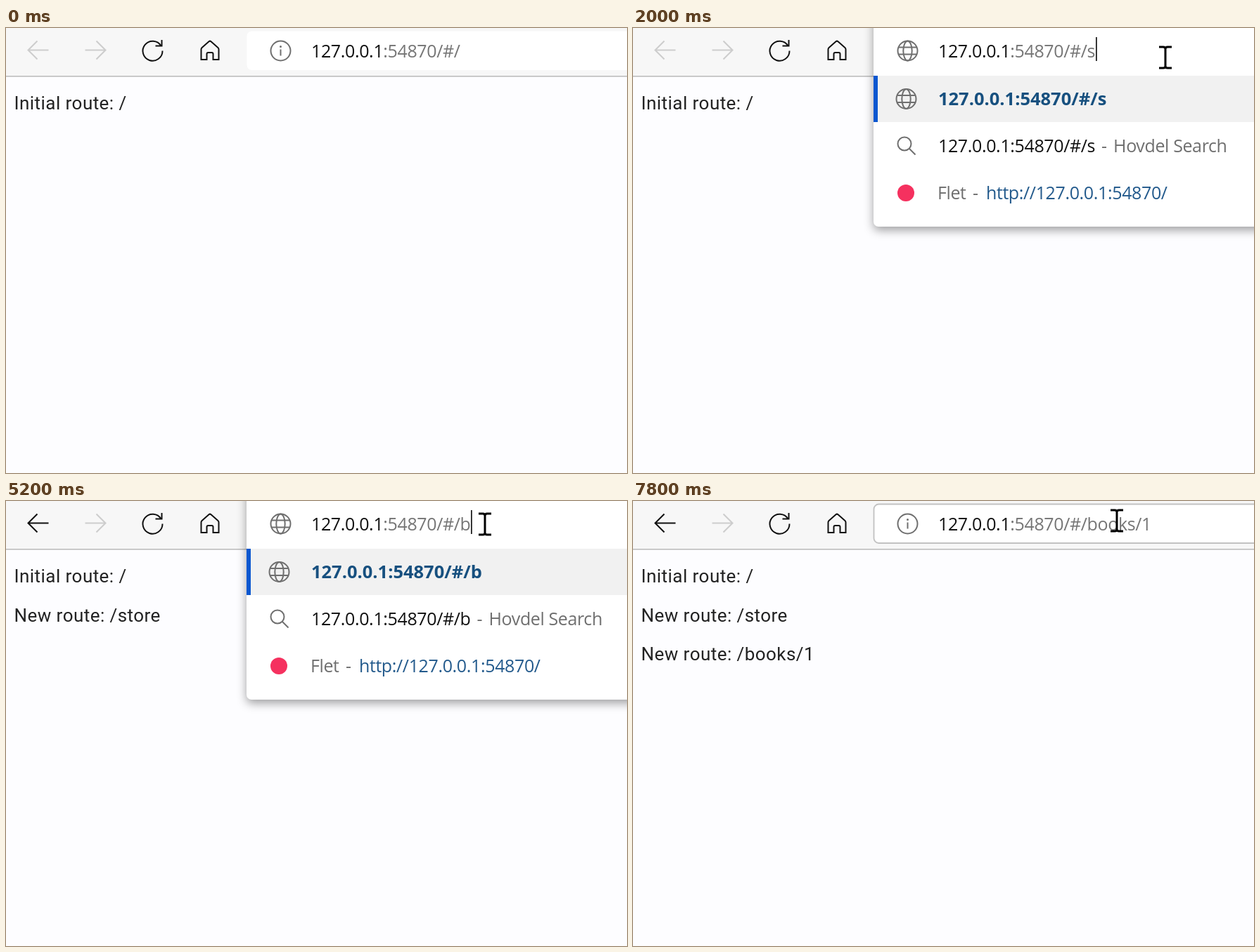
These frames come from a looping animation (883 px wide and 634 px high, 8 s). An HTML page with a canvas:

```html
<!DOCTYPE html>
<html lang="en">
<head>
<meta charset="utf-8">
<style>
html, body { margin: 0; width: 100%; height: 100%; overflow: hidden; background: #fdfdff; }
canvas { display: block; }
</style>
</head>
<body>
<canvas id="stage" width="883" height="634"></canvas>
<script>
const c = document.getElementById('stage').getContext('2d');
const HOST = '127.0.0.1', BASE = HOST + ':54870/#/';
const UI = '25px "Open Sans", "Noto Sans", sans-serif';
const BOLD = 'bold 25.5px "Open Sans", "Noto Sans", sans-serif';
const PAGE = '26px Roboto, sans-serif';
const LOOP = 8000, GREY = '#6f6f6f', INK = '#111';

const idle = { box: 'plain', sel: -1, caret: false, list: false, cursor: null, click: null };
const arrow = (x, y) => ({ kind: 'arrow', x, y });
const beam = (x, y) => ({ kind: 'beam', x, y });
const dot = (x, y) => ({ x, y, r: 6, a: .8 });
const ripple = (x, y) => ({ x, y, r: 20, a: .25 });
const typing = (path, more) => ({ path, list: true, caret: true, sel: -1, click: null, ...more });

// Each step changes only the listed parts of the state.
const steps = [
  [0, { ...idle, path: '', routes: [] }],
  [400, { cursor: arrow(800, 72) }],
  [600, { cursor: beam(714, 33), box: 'hover' }],
  [800, { box: 'focus', sel: 0, click: dot(712, 32.5) }],
  [1000, { cursor: beam(738, 38), click: ripple(714, 33) }],
  [1200, { cursor: beam(757, 42), click: dot(757, 42), sel: -1, caret: true }],
  [1400, { click: ripple(757, 42) }],
  [1600, { click: null, caret: false }],
  [2000, typing('s')],
  [2200, typing('st')],
  [2400, typing('stor')],
  [2600, typing('store')],
  [3000, { ...idle, routes: ['/store'] }],
  [3600, { cursor: beam(706, 38), box: 'hover' }],
  [3800, { cursor: beam(681, 33) }],
  [4000, { cursor: arrow(679, 32), box: 'focus', sel: 0, click: dot(679, 32) }],
  [4200, { click: ripple(679, 32) }],
  [4400, { sel: BASE.length, click: dot(679, 32) }],
  [4600, { click: ripple(679, 32) }],
  [4800, { click: null }],
  [5200, typing('b', { cursor: beam(681, 33) })],
  [5400, typing('bo')],
  [5600, typing('book')],
  [5800, typing('books')],
  [6200, typing('books/')],
  [6400, typing('books/1')],
  [6800, idle],
  [7000, { routes: ['/store', '/books/1'] }],
  [7800, { cursor: beam(688, 28), box: 'hover' }]
];

function setFont(font) {
  c.font = font;
  c.letterSpacing = font === UI ? '-0.38px' : font === PAGE ? '0.45px' : '0px';
}

// Draws text and returns the x where it ends.
function text(s, x, y, color, font = UI) {
  setFont(font);
  c.fillStyle = color;
  c.fillText(s, x, y);
  return x + c.measureText(s).width;
}

function rect(x, y, w, h, color) {
  c.fillStyle = color;
  c.fillRect(x, y, w, h);
}

function stroke(d, color, width = 2) {
  c.strokeStyle = color;
  c.lineWidth = width;
  c.stroke(new Path2D(d));
}

function circle(x, y, r, color, fill) {
  c.beginPath();
  c.arc(x, y, r, 0, 7);
  c.lineWidth = 2;
  c.fillStyle = c.strokeStyle = color;
  fill ? c.fill() : c.stroke();
}

function globe(x, y) {
  circle(x, y, 14, GREY);
  c.beginPath();
  c.ellipse(x, y, 6.2, 14, 0, 0, 7);
  c.stroke();
  stroke(`M${x - 13} ${y - 5}h26M${x - 13} ${y + 5}h26`, GREY);
}

function info() {
  circle(390.5, 32.5, 14, GREY);
  circle(390.5, 26.5, 1.5, GREY, true);
  stroke('M390.5 30.5v9', GREY);
}

function toolbar(canGoBack) {
  rect(0, 0, 883, 68, '#f7f7f7');
  rect(0, 68, 883, 1.6, '#bdbdbd');
  stroke('M60.5 31.5H32M44.5 18.5l-13 13l13 13', canGoBack ? INK : '#cdcdcd');
  stroke('M112.5 31.5H141M128.500 18.500l13 13l-13 13', '#cdcdcd');
  stroke('M222.500 32.500A14 14 0 1 1 220.500 25.500M221.500 17v8.500h-9', INK);
  stroke('M277.500 45V30.500Q277.500 29 278.600 28L288.500 19.300Q290 18 291.500 19.300L301.400 28' +
    'Q302.500 29 302.500 30.500V45H294.500V37Q294.500 35 292.500 35H287.500Q285.500 35 285.500 37V45Z', INK);
}

function addressBox(style) {
  c.beginPath();
  c.roundRect(342.5, 4.500, 600, 55.500, 7);
  c.fillStyle = '#fff';
  c.fill();
  if (style === 'plain') return;
  c.lineWidth = style === 'focus' ? 3.500 : 1.800;
  c.strokeStyle = style === 'focus' ? '#93b7ea' : '#c2c2c2';
  c.stroke();
}

function suggestions(url) {
  c.save();
  c.shadowColor = 'rgba(0,0,0,.38)';
  c.shadowBlur = 14;
  c.shadowOffsetY = 5;
  c.beginPath();
  c.roundRect(342, -20, 600, 303, 7);
  c.fillStyle = '#fff';
  c.fill();
  c.restore();
  rect(342, 68, 541, 66, '#f1f1f1');
  rect(342, 68, 6, 66, '#0a57d0');
  globe(388.500, 101);
  text(url, 434, 110, '#17507f', BOLD);
  circle(386, 165, 9.500, GREY);
  stroke('M392.500 171.500l9 9', GREY);
  const end = text(url, 434, 177, INK);
  text('-', end + 9, 177, GREY);
  text('Hovdel Search', end + 26, 177, GREY);
  circle(388, 235, 12, '#f5315f', true);
  text('Flet', 433, 244, GREY);
  text('-', 483, 244, GREY);
  text('http://127.0.0.1:54870/', 502, 244, '#235a8c');
}

function address(s, url) {
  const x = text(HOST, 434, 42, INK);
  const end = text(url.slice(HOST.length), x, 42, '#767676');
  if (s.sel >= 0) {
    const from = 433 + c.measureText(url.slice(0, s.sel)).width;
    c.save();
    c.beginPath();
    c.rect(from, 12, end - from + 1, 41);
    c.clip();
    rect(from, 12, 400, 41, '#0078d7');
    text(url, 434, 42, '#fff');
    c.restore();
  }
  if (s.caret) rect(Math.round(end) + 1, 13, 1.800, 34, '#222');
}

function pointer({ kind, x, y }) {
  c.save();
  c.translate(x, y);
  if (kind === 'arrow') {
    const shape = 'M0 0V31.500L7.500 25L12 34.500L16.500 32.500L12 23H22Z';
    c.fillStyle = '#fff';
    c.fill(new Path2D(shape));
    stroke(shape, '#000', 1.500);
  } else {
    stroke('M-9 -15H-3Q0 -15 0 -12V12Q0 15 -3 15H-9M9 -15H3Q0 -15 0 -12M0 12Q0 15 3 15H9', '#000', 3);
  }
  c.restore();
}

function draw(now) {
  const t = now % LOOP;
  const s = Object.assign({}, ...steps.filter(([at]) => at <= t).map(([, change]) => change));
  const url = BASE + s.path;
  rect(0, 0, 883, 634, '#fdfdff');
  ['Initial route: /', ...s.routes.map(r => 'New route: ' + r)]
    .forEach((line, i) => text(line, 11.500, 116 + i * 55.700, '#222', PAGE));
  toolbar(s.routes.length > 0);
  if (s.list) {
    suggestions(url);
    globe(390.500, 32.500);
  } else {
    addressBox(s.box);
    info();
  }
  address(s, url);
  if (s.click) circle(s.click.x, s.click.y, s.click.r, `rgba(232,50,62,${s.click.a})`, true);
  if (s.cursor) pointer(s.cursor);
  requestAnimationFrame(draw);
}
requestAnimationFrame(draw);
</script>
</body>
</html>
```
